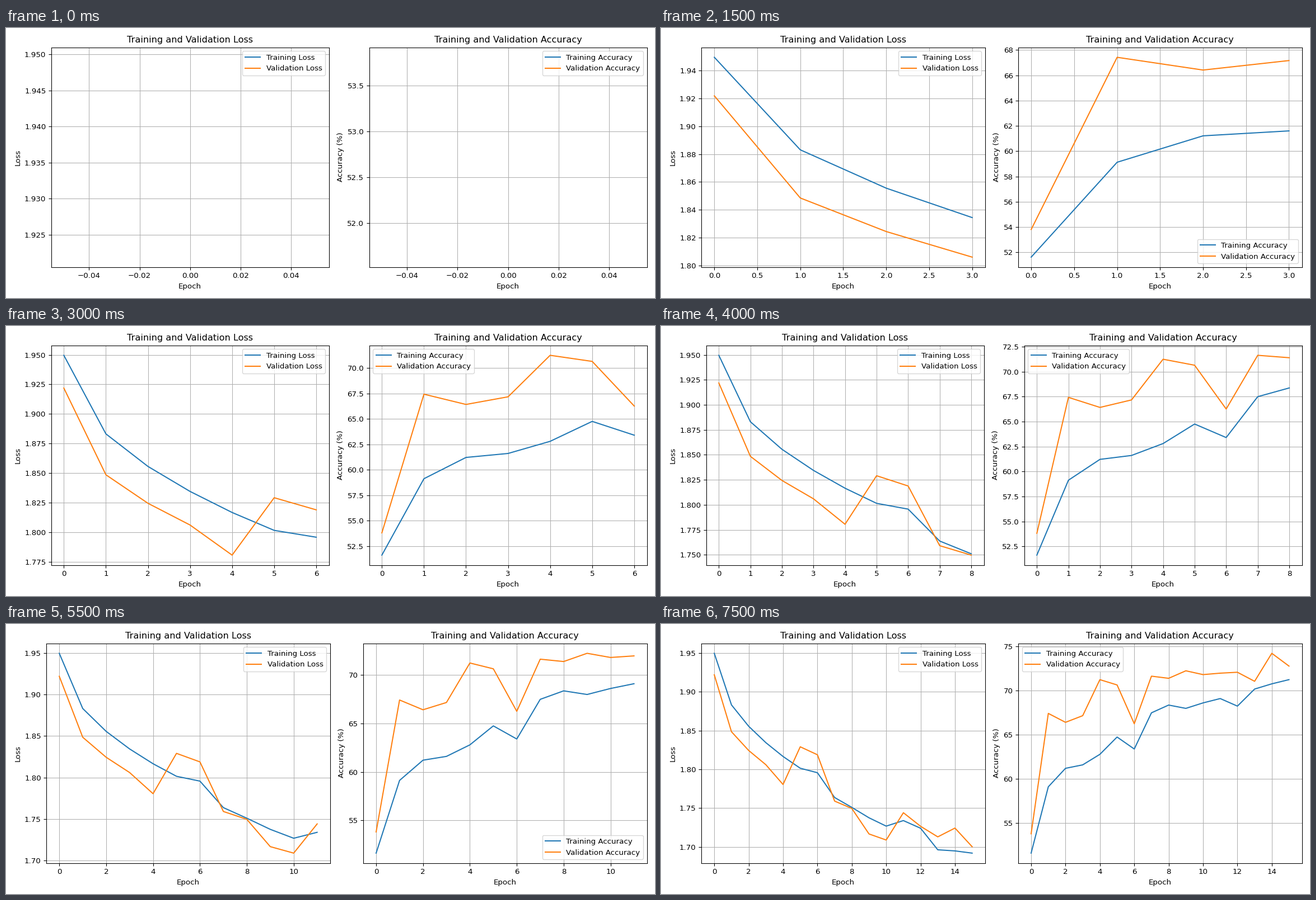
These frames come from a looping animation (1159 by 483 pixels, 8 s). A matplotlib script:

```python
import matplotlib.pyplot as plt
import numpy as np
from matplotlib.animation import FuncAnimation

EPOCHS = 16
STEP_MS = 500
BUMP_WIDTH = 0.6


def curve(start, gain, power, bumps):
    """Power-law learning curve disturbed by (epoch, height) bumps."""
    n = np.arange(EPOCHS)
    y = start + gain * n**power
    for centre, height in bumps:
        y += height * np.exp(-((n - centre) / BUMP_WIDTH) ** 2)
    return y


LOSS = (
    curve(1.9496, -0.0665, 0.5, [(6, 0.009), (7.5, -0.021), (9.5, -0.025),
                                 (11.5, 0.010), (13.35, -0.019)]),
    curve(1.9219, -0.0734, 0.41, [(4, -0.012), (5.5, 0.1), (9.5, -0.049),
                                  (11.35, 0.026), (14, 0.019)]),
)
ACCURACY = (
    curve(51.625, 7.5, 0.355, [(3.5, -2.2), (6, -2.4), (7.5, 2.1), (12, -1.5)]),
    curve(53.81, 13.62, 0.12, [(2.5, -4.4), (4.35, 1.9), (6, -4.5), (7, 0.9),
                               (9, 0.7), (13, -1.4), (14, 1.8)]),
)

fig = plt.figure(figsize=(11.998, 5), dpi=96.6)  # 1159 x 483 px


def draw_panel(ax, name, unit, curves, n):
    for kind, values in zip(("Training", "Validation"), curves):
        ax.plot(values[:n], label=f"{kind} {name}")
    ax.set_title(f"Training and Validation {name}")
    ax.set_xlabel("Epoch")
    ax.set_ylabel(name + unit)
    ax.legend()
    ax.grid(True)


def update(epoch):
    fig.clear()
    loss_ax, acc_ax = fig.subplots(1, 2)
    draw_panel(loss_ax, "Loss", "", LOSS, epoch + 1)
    draw_panel(acc_ax, "Accuracy", " (%)", ACCURACY, epoch + 1)
    fig.tight_layout()
    return []


anim = FuncAnimation(fig, update, frames=EPOCHS, init_func=lambda: [],
                     interval=STEP_MS, repeat=True, repeat_delay=0)
plt.show()
```
